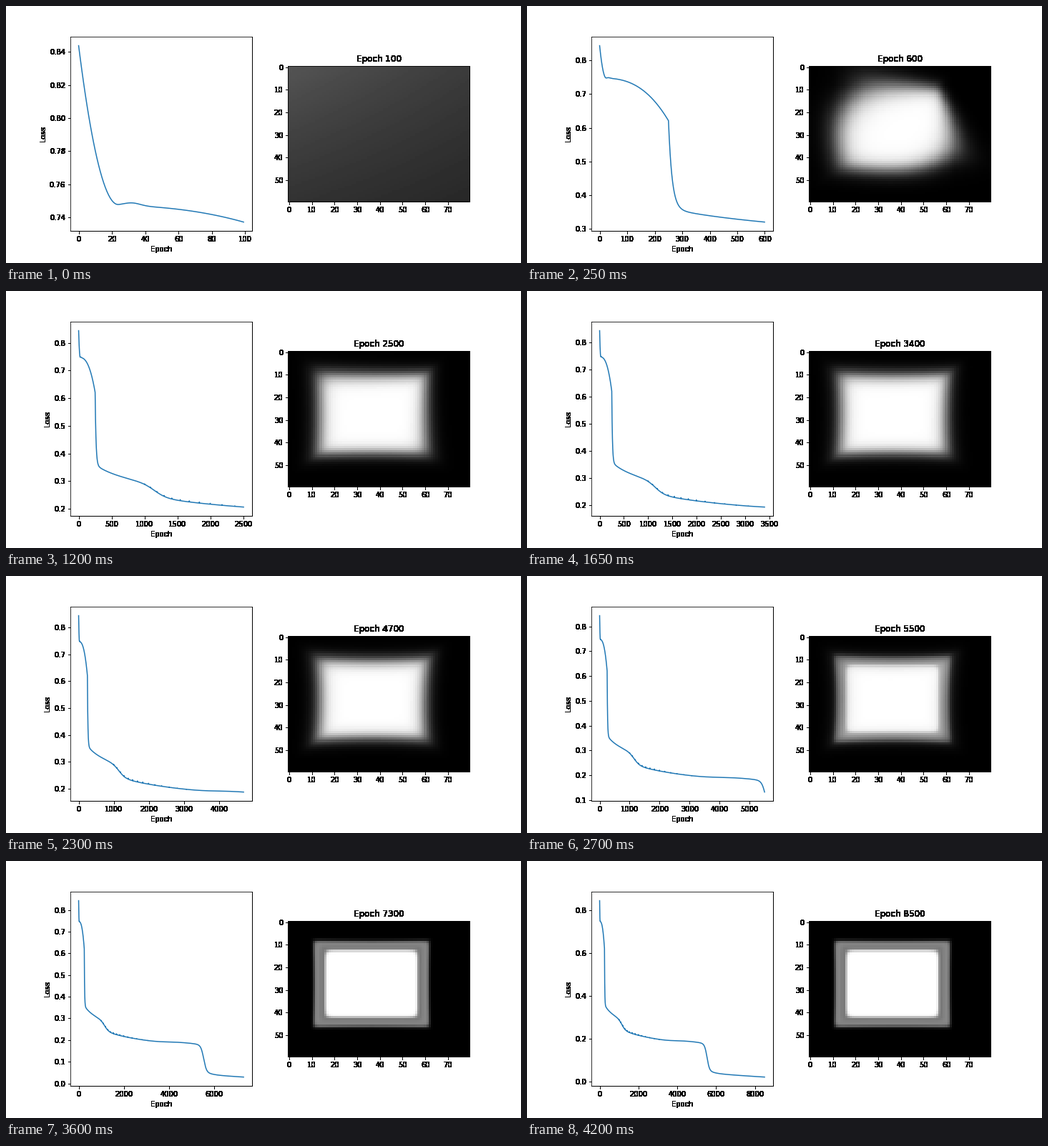
These frames come from a looping animation (720x360 px, 4250 ms). A matplotlib script:

```python
import numpy as np
import matplotlib.pyplot as plt
from matplotlib.animation import FuncAnimation

FRAMES, STEP, INTERVAL = 85, 100, 50
W, H = 80, 60

plt.rcParams.update({
    "font.family": "DejaVu Sans",
    "font.size": 10,
    "figure.subplot.bottom": 0.125,
})


def sigmoid(z):
    return 1 / (1 + np.exp(-np.clip(z, -30, 30)))


# ---- loss curve -------------------------------------------------------
def plateau(e):
    """Quick first drop, small rebound, then a slide that steepens."""
    first = 0.0962 * np.clip(1 - e / 24, 0, 1) ** 2
    rebound = 0.0017 * np.exp(-((e - 32) / 7) ** 2)
    return 0.7475 + first + rebound - 0.1265 * (e / 250) ** 2.7


def descent(e):
    """Logarithmic decline with two later steps down."""
    slow = 0.352 - 0.046 * np.log(np.maximum(e, 1) / 300)
    slow += 0.011 * sigmoid((e - 3900) / 300)
    step = 0.048 * sigmoid((e - 1150) / 95)
    fall = 0.122 * sigmoid((e - 5535) / 62) + 0.017 * sigmoid((e - 5650) / 220)
    return slow - step - fall


def loss_curve(e):
    cliff = (plateau(250) - descent(250)) * np.exp(-np.maximum(e - 250, 0) / 13)
    y = np.where(e < 250, plateau(e), descent(e) + cliff)
    for n in range(14):
        s = round(1000 * 1.09 ** n)
        height = 0.0035 * np.exp(-((s - 1670) / 700) ** 2) + 0.0005
        y += np.where(e >= s, height * np.exp(-np.maximum(e - s, 0) / 4), 0)
    return y


epochs = np.arange(FRAMES * STEP)
loss = loss_curve(epochs)


# ---- predicted picture ------------------------------------------------
X, Y = np.meshgrid(np.arange(W), np.arange(H))
U = np.clip((X - 36.5) / 25, -1.1, 1.1)
V = np.clip((Y - 27.5) / 18, -1.1, 1.1)

# Shape of the soft box: (early, late)
POSE = {
    "xl": (15.9, 12.6), "xr": (59.2, 60.8),
    "yt": (11.0, 10.0), "yb": (43.0, 45.3),
    "wl": (3.2, 1.9), "wr": (2.8, 1.8), "wt": (3.2, 1.6), "wb": (2.2, 1.5),
    "slant": (4.5, -0.5), "tilt": (0.9, 0.0), "bow": (-4.2, 1.2),
    "k": (0.5, 1.2), "twist": (0.9, 0.15),
}


def box(xl, xr, yt, yb, wl, wr, wt, wb,
        slant=0, tilt=0, bow=0, k=1.0, twist=0):
    """Logits of a soft box: smooth minimum of the distances to its sides."""
    bx, by = bow * (1 - V * V), bow * 0.7 * (1 - U * U)
    sides = np.stack([
        (X - xl - bx) / wl,
        (xr - bx + slant * V - X) / (wr * np.exp(tilt * V)),
        (Y - yt - by) / (wt * np.exp(-tilt * U)),
        (yb - by - Y) / wb,
    ])
    k = k * np.exp(-twist * U * V)
    low = sides.min(axis=0)
    return low - np.log(np.exp(-k * (sides - low)).sum(axis=0)) / k


def blurred(epoch):
    early = np.exp(-max(epoch - 300, 0) / 1000)
    z = box(**{key: b + (a - b) * early for key, (a, b) in POSE.items()})
    if epoch < 300:
        x, y = X / (W - 1), Y / (H - 1)
        start = -0.70 - 0.48 * x - 0.69 * y + 0.19 * x * y
        mix = ((epoch - 100) / 200) ** 2.7
        z = (1 - mix) * start + mix * np.clip(z, -6, 6)
    return sigmoid(z)


def frame_box(inset, width, **shape):
    return sigmoid(box(11 + inset, 61.6 - inset, 8.6 + inset * 0.83,
                       46.3 - inset * 0.86, *[width] * 4, **shape))


def sharp(epoch):
    bow = 0.2 + 0.6 * np.exp(-max(epoch - 6200, 0) / 400)
    outer = frame_box(-bow / 2, 0.35, bow=bow, k=0.5)
    middle = frame_box(2.9, 0.6, bow=bow / 2, k=0.6)
    inner = frame_box(4.95, 0.3, k=0.3)
    return 0.54 * outer - 0.10 * middle + 0.56 * inner


def picture(epoch):
    s = np.clip((0.182 - loss[epoch - 1]) / (0.182 - 0.045), 0, 1)
    return (1 - s) * blurred(epoch) + s * sharp(epoch)


# ---- figure -----------------------------------------------------------
def drop_alpha(img, dpi):
    """Make every touched pixel opaque, which gives hard text edges."""
    out = np.rint(img * 255).astype(np.uint8)
    out[..., 3] = np.where(out[..., 3] > 0, 255, 0)
    return out, 0, 0


fig, (ax_loss, ax_img) = plt.subplots(1, 2, figsize=(10, 5), dpi=72,
                                      facecolor="white")
for ax in (ax_loss, ax_img):
    ax.set_agg_filter(drop_alpha)

line, = ax_loss.plot([], [], color="#1f77b4", lw=1.5)
ax_loss.set_xlabel("Epoch")
ax_loss.set_ylabel("Loss")
view = ax_img.imshow(np.zeros((H, W)), cmap="gray", vmin=0, vmax=1,
                     interpolation="nearest")
title = ax_img.set_title("")


def update(i):
    n = (i + 1) * STEP
    line.set_data(epochs[:n], loss[:n])
    ax_loss.relim()
    ax_loss.autoscale_view()
    view.set_data(picture(n))
    title.set_text(f"Epoch {n}")
    return line, view, title


anim = FuncAnimation(fig, update, frames=FRAMES, interval=INTERVAL,
                     repeat=True, repeat_delay=0, blit=False)
plt.show()
```
